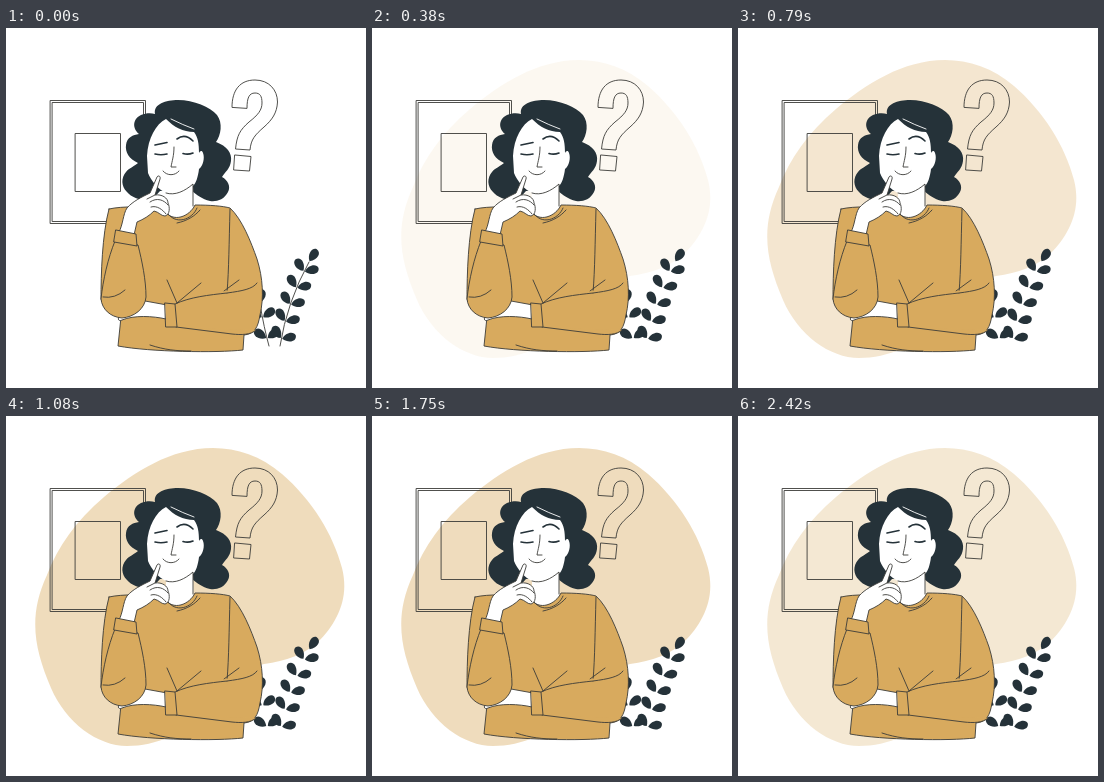
An HTML page for the animation above (2540 ms loop, 360x360 px).

```html
<!DOCTYPE html>
<html lang="en">
<head>
<meta charset="utf-8">
<title>Thinking</title>
<style>
  html, body { margin: 0; width: 100%; height: 100%; overflow: hidden; background: #fff; }
  svg { display: block; width: 100vw; height: 100vh; }
  .line { fill: none; stroke: #3d3d39; stroke-width: .9; stroke-linecap: round; stroke-linejoin: round; }
  .dark { fill: #253239; }
  .skin { fill: #fff; }
  .wool { fill: #d8aa5e; }
  .bold { stroke: #253239; stroke-width: 1.6; }
</style>
</head>
<body>
<svg viewBox="0 0 360 360">
  <path id="blob" fill="#d7a85b" opacity="0" d="M207 32C231 32 255 40 276 58C306 84 327 118 336 152C344 183 330 208 312 226C299 238 280 245 258 248C225 256 220 275 198 296C180 317 150 330 121 330C92 330 60 307 45 272C28 232 22 200 41 159C52 130 70 105 98 81C128 56 165 32 207 32Z"/>

  <g class="line">
    <rect x="44.500" y="72.500" width="95" height="123"/>
    <rect x="46.500" y="74.500" width="91" height="119"/>
    <rect x="69.500" y="105.500" width="45" height="58"/>
    <path d="M226 79C226 62 234 52 249 52C263 52 271.500 62 271.500 74C271 85 266 92 258 99C249 107 245 111 244 122L229.500 121C231 107 234 102 243 94C252 87 256 82 256 75C256 68 254 65 249 65C243 65 241 70 241 80ZM229 127L245 128.500L243.500 143L228 142Z"/>
  </g>

  <g id="stems" class="line"></g>
  <g id="leaves" class="dark"></g>

  <!-- head -->
  <path class="dark" d="M149 86C147 76 160 72 172 72C188 72 204 79 211 87C217 95 215 107 210 114C221 118 226 125 225 133C224 141 219 144 216 149C222 152 225 159 222 164C218 172 210 174 204 173C196 171 191 167 186 163H154L146 172C137 174 126 170 121 164C115 158 115 150 120 144C123 140 129 138 132 135C123 131 119 124 120 117C121 109 127 107 133 106C125 99 128 90 135 87C140 85 145 85 149 86Z"/>
  <path class="skin" d="M160 91C150 96 142 110 141 128L142 145C145 153 153 162 160 165V192H188L187 158C190 155 192 149 193 141C197 138 199 130 197 125C196 122 194 123 193 125C193 116 192 109 188 104C177 104 168 99 160 91Z"/>
  <path class="line" stroke-width="1" style="stroke:#fff" d="M165 91Q177 97 188 101"/>
  <path class="line" d="M160 165C169 168 179 163 187 156V178M168 119C168 128 166 133 165 139H170M157 143C161 148 169 148 173 143"/>
  <path class="line bold" d="M149 117L161 114.500M171 111Q179 105 187 113M149 126Q155 127.500 161 126M177 125.500Q182 127 187 125"/>

  <!-- body -->
  <path class="line wool" style="fill:#d8aa5e" d="M103 181C116 178 141 178 158 182C167 196 184 188 189 177C204 177 217 178 224 180C236 191 245 214 251 231C257 250 258 270 254 287C252 299 249 306 238 307L237 322C211 325 144 324 112 318L115 289C106 287 98 280 95 271C95 247 96 207 103 181Z"/>
  <path class="line" d="M160 183C169 199 187 191 191 180M171 195C181 193 189 188 194 182M224 181C223 216 223 240 221 265M218 263L233 252"/>
  <path class="line skin" style="fill:#fff" d="M139 273L161 277L160 291C147 288 128 287 116 292C112 294 111 290 114 288Z"/>
  <path class="line" style="fill:#d8aa5e" d="M169 276C184 269 203 267 221 265C236 263 247 261 251 255M250 302C245 307 235 307 226 306L170 299"/>
  <path class="line" style="fill:#d8aa5e" d="M159 275L169 276L171 299L160 299Z"/>
  <path class="line" d="M171 275L161 252M171 275L195 255M144 317C159 322 171 323 185 323"/>

  <!-- raised arm -->
  <path class="line" style="fill:#fff" d="M113 204C117 197 117 186 121 180C127 173 136 169 144 165L151 149C152 147 155 148 154 151L149 167C156 166 162 170 162 175C164 179 164 187 159 188C155 188 153 184 148 183C143 188 138 191 131 194L128 207Z"/>
  <path class="line" d="M149 167L141 171M144 174C151 169 158 172 162 177M145 179C151 177 157 182 160 186"/>
  <path class="line" style="fill:#d8aa5e" d="M109 213L132 217C136 233 140 252 140 269C139 281 128 289 116 290C104 289 96 281 95 271C97 252 102 230 109 213Z"/>
  <path class="line" style="fill:#d8aa5e" d="M110 202L130 206L131 218L108 214Z"/>
  <path class="line" d="M97 269Q109 271 119 262"/>
</svg>
<script>
  const LOOP = 2540, STEP = 1000 / 24, LAST = 58, PEAK = 32;
  const [blob, stems, leaves] = ["blob", "stems", "leaves"].map(id => document.getElementById(id));

  const leaf = (x, y, angle) =>
    `<path transform="translate(${x} ${y}) rotate(${angle})" d="M1 0C5 -6 14 -6 15 -1C15 5 7 6 1 0Z"/>`;

  // A curved stem with evenly spaced pairs of leaves and one leaf at the tip.
  function branch(start, bend, tip, pairs, lean) {
    const at = u => start.map((s, i) => (1 - u) ** 2 * s + 2 * u * (1 - u) * bend[i] + u * u * tip[i]);
    stems.innerHTML += `<path d="M${start}Q${bend} ${tip}"/>`;
    for (let i = 0; i < pairs; i++) {
      const [x, y] = at((i + .4) / pairs);
      leaves.innerHTML += leaf(x, y, lean - 65) + leaf(x, y, lean + 45);
    }
    leaves.innerHTML += leaf(...tip, lean);
  }
  branch([274, 318], [281, 274], [303, 234], 5, -55);
  branch([263, 318], [258, 300], [254, 276], 2, -80);

  const smooth = u => u * u * (3 - 2 * u);

  function draw(now) {
    const step = Math.min(LAST, Math.floor((now % LOOP + 5) / STEP));
    blob.setAttribute("opacity", step < PEAK
      ? .445 * smooth(step / PEAK)
      : .445 - .195 * smooth((step - PEAK) / PEAK));
    stems.style.display = step ? "none" : "";
    requestAnimationFrame(draw);
  }
  draw(0);
</script>
</body>
</html>
```
